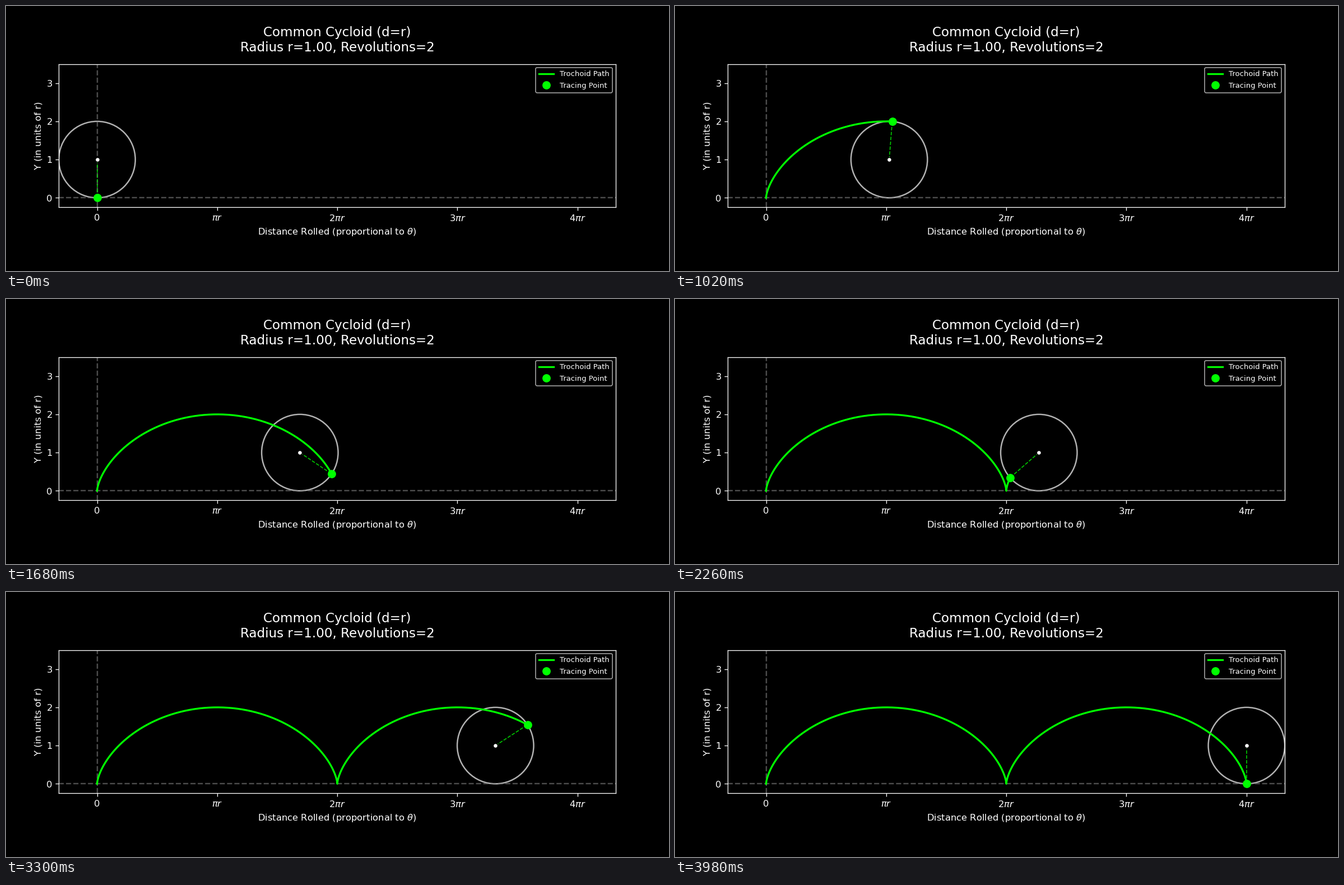
A matplotlib script that plays this animation: 1183 px wide and 473 px high, repeating every 4000 ms.

```python
import numpy as np
import matplotlib.pyplot as plt
from matplotlib.animation import FuncAnimation

RADIUS = 1.0
REVOLUTIONS = 2
FRAMES = 200
INTERVAL = 20  # ms
GREEN = "#00ff00"

plt.style.use("dark_background")
plt.rcParams["font.family"] = "DejaVu Sans"

theta = np.linspace(0, 2 * np.pi * REVOLUTIONS, FRAMES)
center_x = RADIUS * theta
path_x = center_x - RADIUS * np.sin(theta)
path_y = RADIUS - RADIUS * np.cos(theta)

fig, ax = plt.subplots(figsize=(10, 4), dpi=118.3)
fig.subplots_adjust(left=0.0797, right=0.9197, bottom=0.2, top=0.8208)
ax.set_aspect("equal")
ax.set_xlim(-RADIUS, center_x[-1] + RADIUS)
ax.set_ylim(-0.25, 3.5)

ax.set_title(
    f"Common Cycloid (d=r)\nRadius r={RADIUS:.2f}, Revolutions={REVOLUTIONS}",
    fontsize=14, pad=14,
)
ax.set_xlabel(r"Distance Rolled (proportional to $\theta$)")
ax.set_ylabel("Y (in units of r)")
ax.set_xticks(
    np.pi * RADIUS * np.arange(2 * REVOLUTIONS + 1),
    ["0", r"$\pi r$", r"$2\pi r$", r"$3\pi r$", r"$4\pi r$"],
)
ax.set_yticks(range(4))

guide = dict(color="gray", linestyle="--", linewidth=1.5, alpha=0.6)
ax.axhline(0, **guide)
ax.axvline(0, **guide)

wheel = plt.Circle((0, RADIUS), RADIUS, fill=False, edgecolor="lightgray",
                   linewidth=1.5, alpha=0.85)
ax.add_patch(wheel)
trail, = ax.plot([], [], color=GREEN, linewidth=2, label="Trochoid Path")
spoke, = ax.plot([], [], color=GREEN, linestyle="--", linewidth=1, alpha=0.8)
hub, = ax.plot([], [], "o", color="white", markersize=5,
               markeredgecolor="black")
tracer, = ax.plot([], [], "o", color=GREEN, markersize=8,
                  label="Tracing Point")
ax.legend(loc="upper right", fontsize=8, labelspacing=0.58,
          borderpad=0.43, borderaxespad=0.46)


def update(i):
    x, px, py = center_x[i], path_x[i], path_y[i]
    wheel.center = (x, RADIUS)
    trail.set_data(path_x[:i + 1], path_y[:i + 1])
    spoke.set_data([x, px], [RADIUS, py])
    hub.set_data([x], [RADIUS])
    tracer.set_data([px], [py])
    return wheel, trail, spoke, hub, tracer


anim = FuncAnimation(fig, update, frames=FRAMES, interval=INTERVAL,
                     repeat=True, repeat_delay=0)
plt.show()
```
